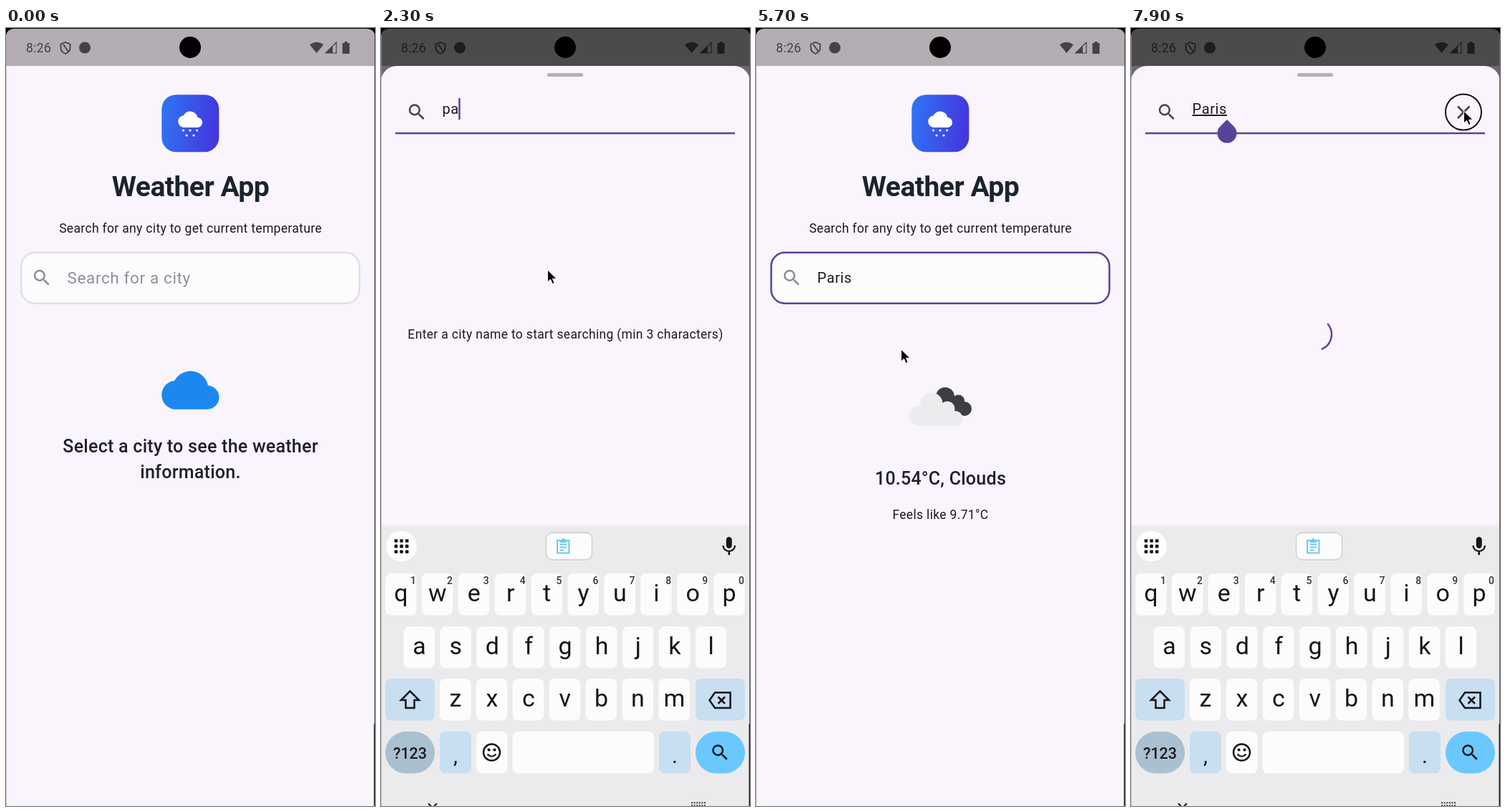
An HTML page that plays this animation: 515 by 1087 pixels, repeating every 8 s.

```html
<!DOCTYPE html>
<html lang="en">
<head>
<meta charset="utf-8">
<title>Weather App</title>
<style>
  html, body { margin: 0; width: 100%; height: 100%; overflow: hidden; background: #faf4fc; }
  svg { display: block; }
  text { font-family: Roboto, Arial, sans-serif; fill: #1b1a20; white-space: pre; }
  .body { font-size: 20px; letter-spacing: .63px; }
  .small { font-size: 17.5px; letter-spacing: .33px; }
  .head { font-size: 25px; font-weight: 500; letter-spacing: .26px; fill: #1c202c; }
  .title { font-size: 39px; font-weight: 700; letter-spacing: -.5px; fill: #1b232e; }
  .mid { text-anchor: middle; }
  .key { font-size: 34px; text-anchor: middle; fill: #161618; }
  .hint { font-size: 14px; font-weight: 500; text-anchor: middle; fill: #333338; }
  .line { fill: none; stroke: #161618; stroke-width: 2.5; }
  .spin { fill: none; stroke: #55459a; stroke-width: 2.5; }
</style>
</head>
<body>
<svg width="515" height="1087" viewBox="0 0 515 1087">
  <defs>
    <linearGradient id="blue" x2="1" y2=".12">
      <stop stop-color="#2f76f4"/><stop offset="1" stop-color="#4338df"/>
    </linearGradient>
    <radialGradient id="ink">
      <stop offset=".5" stop-color="#000" stop-opacity=".1"/>
      <stop offset=".78" stop-color="#000" stop-opacity=".07"/>
      <stop offset="1" stop-color="#000" stop-opacity="0"/>
    </radialGradient>
    <clipPath id="row"><rect y="105" width="515" height="71"/></clipPath>
    <path id="cloud" d="M19.35 10.04C18.67 6.59 15.64 4 12 4 9.11 4 6.6 5.64 5.35 8.04 2.34 8.36 0 10.91 0 14c0 3.31 2.69 6 6 6h13c2.76 0 5-2.24 5-5 0-2.64-2.05-4.78-4.65-4.96z"/>
    <path id="glass" d="M15.5 14h-.79l-.28-.27A6.47 6.47 0 0 0 16 9.5 6.5 6.5 0 1 0 9.5 16c1.61 0 3.09-.59 4.23-1.57l.27.28v.79l5 4.99L20.49 19l-4.99-5zm-6 0a4.5 4.5 0 1 1 0-9 4.5 4.5 0 0 1 0 9z"/>
  </defs>

  <rect width="515" height="1087" fill="#faf4fc"/>
  <g id="home">
    <rect width="515" height="53" fill="#b4adb3"/>
    <g fill="#454145">
      <text x="28" y="34" class="small" style="fill:#454145">8:26</text>
      <path d="M76.500 22.500L83 20l6.500 2.500v5c0 4-2.800 7-6.500 8.500-3.700-1.500-6.500-4.500-6.500-8.500zM80 23l7 10" fill="none" stroke="#454145" stroke-width="1.800"/>
      <circle cx="110" cy="27.500" r="8"/>
      <path d="M424 23.500Q433.500 16 443 23.500L433.500 35z"/>
      <path d="M446 35L461 20V35z" fill="none" stroke="#454145" stroke-width="1.200"/>
      <path d="M446 35L456 25V35z"/>
      <path d="M469.500 21h3v-2h4v2h3v15h-10z"/>
    </g>
    <rect x="217.300" y="93.200" width="80" height="80" rx="20" fill="url(#blue)"/>
    <g fill="#fff">
      <use href="#cloud" transform="translate(240.200 110.800) scale(1.410)"/>
      <circle cx="247.500" cy="143" r="1.600"/><circle cx="257" cy="143" r="1.600"/><circle cx="266.500" cy="143" r="1.600"/>
      <circle cx="252" cy="150" r="1.600"/><circle cx="262" cy="150" r="1.600"/>
    </g>
    <text x="257.500" y="234.500" class="title mid">Weather App</text>
    <text x="257.500" y="286" class="small mid">Search for any city to get current temperature</text>
    <rect id="field" x="21.200" y="313.700" width="472" height="71" rx="19" fill="#fcfcfd" stroke-width="2.500"/>
    <use href="#glass" transform="translate(35 334) scale(1.250)" fill="#8f8b97"/>
    <text id="prompt" x="85.500" y="357" style="font-size:22.500px;letter-spacing:.63px;fill:#918d9b">Search for a city</text>
    <text id="chosen" x="85.500" y="356" class="body">Paris</text>
    <g id="empty">
      <use href="#cloud" transform="translate(217.300 466) scale(3.340)" fill="#1c88ef"/>
      <text x="257.500" y="593" class="head mid">Select a city to see the weather</text>
      <text x="257.500" y="629" class="head mid">information.</text>
    </g>
    <g id="weather">
      <g fill="#3e3d41"><circle cx="264" cy="515" r="13"/><circle cx="282.500" cy="521" r="8.500"/><circle cx="291" cy="532" r="10"/><path d="M258 515H286V542H258z"/></g>
      <g fill="#ececee"><circle cx="245" cy="525" r="15.500"/><circle cx="228" cy="542" r="14"/><circle cx="267" cy="532" r="10.500"/><circle cx="278" cy="545.500" r="10.500"/><path d="M228 528H272L278 556H228z"/></g>
      <text x="257.500" y="638" class="head mid">10.54°C, Clouds</text>
      <text x="257.500" y="686" class="small mid">Feels like 9.71°C</text>
    </g>
    <path id="homeSpin" class="spin" transform="translate(257.500 506)"/>
  </g>
  <rect id="scrim" width="515" height="1087"/>

  <g id="sheet">
    <rect width="515" height="1200" rx="22" fill="#faf4fc"/>
    <rect x="232" y="10" width="50" height="5" rx="2.500" fill="#b4b0b6"/>
    <use href="#glass" transform="translate(35 49.500) scale(1.250)" fill="#45404a"/>
    <text id="query" x="85.500" y="67" class="body"></text>
    <rect id="caret" y="45" width="2.500" height="30" fill="#55459a"/>
    <rect id="rule" x="20" width="474"/>
    <g id="list"></g>
    <g clip-path="url(#row)"><circle id="ripple" cx="130" cy="141" fill="url(#ink)"/></g>
    <g id="clear">
      <circle id="ring" cx="464" cy="64.500" r="25" fill="none" stroke="#111" stroke-width="2"/>
      <path d="M456 56.500l16.500 16.500M472.500 56.500L456 73" fill="none" stroke="#45404a" stroke-width="2.500"/>
    </g>
    <path id="grip" d="M134 75l9.600 9.600a13.500 13.500 0 1 1-19.200 0z" fill="#55459a"/>
    <g id="center">
      <path id="spin" class="spin"/>
      <text id="note" y="5.500" class="small mid">Enter a city name to start searching (min 3 characters)</text>
    </g>
  </g>

  <g id="board">
    <rect y="694" width="515" height="3" fill="#f2eff4"/>
    <rect y="696" width="515" height="500" fill="#ebebed"/>
    <circle cx="28.500" cy="724" r="21.500" fill="#fdfdfd"/>
    <g id="dots" fill="#161618"></g>
    <g id="chip">
      <rect x="230.500" y="705" width="64" height="38" rx="9" fill="#fcfcfd" stroke="#cbcbcf" stroke-width="1.300"/>
      <path d="M246 716h16.500v17.500H246zM249.500 721.500h9.500M249.500 725.500h9.500M249.500 729.500h6" fill="none" stroke="#6dc8f0" stroke-width="2"/>
      <path d="M250 719v-4h2.500a2 2 0 0 1 4 0h2.500v4z" fill="#6dc8f0"/>
    </g>
    <path transform="translate(469.800 708.300) scale(1.330)" fill="#161618" d="M12 14c1.660 0 2.990-1.340 2.990-3L15 5c0-1.660-1.340-3-3-3S9 3.340 9 5v6c0 1.660 1.340 3 3 3zm5.300-3c0 3-2.540 5.100-5.300 5.100S6.700 14 6.700 11H5c0 3.410 2.720 6.230 6 6.720V21h2v-3.280c3.280-.48 6-3.300 6-6.720h-1.700z"/>
    <g id="keys"></g>
    <path class="line" d="M40.500 926.500L53 939H46.500V950H34.500V939H28z"/>
    <path class="line" d="M466 928.500H487.500V950H466L458.500 939.200zM470.500 934.500l9.500 9.500M480 934.500l-9.500 9.500"/>
    <text x="40.500" y="1021" class="mid" style="font-size:21.500px;font-weight:500">?123</text>
    <text x="104" y="1027" class="key" style="font-size:30px">,</text>
    <text x="410" y="1027" class="key" style="font-size:30px">.</text>
    <circle class="line" cx="154.500" cy="1012" r="11.500"/>
    <circle cx="150.500" cy="1008.500" r="2"/><circle cx="158.500" cy="1008.500" r="2"/>
    <path class="line" style="stroke-width:2.200" d="M148.500 1014.500q6 6.500 12 0"/>
    <use href="#glass" transform="translate(458.500 997.500) scale(1.230)" fill="#161618"/>
    <path class="line" style="stroke-width:2" d="M66 1083.500l6 6 6-6"/>
    <path d="M433 1082.500h20M433 1086.500h20" stroke="#333" stroke-width="2" stroke-dasharray="2 1.600"/>
  </g>

  <path d="M0 0H515V10Q513 1 503 1H12Q2 1 0 10z"/>
  <rect y="10" width=".6" height="1077" fill="#aaa6ac"/>
  <rect x="514" y="8" width="1" height="1079" fill="#5c595e"/>
  <rect x="513.500" y="972" width="1.500" height="115" fill="#222"/>
  <circle cx="257" cy="27" r="15"/>
  <path id="mouse" d="M0 0V17L4 13.200L6.800 19.500L9.600 18.300L7 12.200H12.500z" stroke="#fff" stroke-width="1" stroke-linejoin="round"/>
</svg>
<script>
const LOOP = 8000, STEP = 100;
const el = id => document.getElementById(id);
const set = (id, attrs) => { for (const k in attrs) el(id).setAttribute(k, attrs[k]); };
const show = (id, on) => { el(id).style.display = on ? '' : 'none'; };
const move = (id, x, y) => set(id, { transform: `translate(${x} ${y})` });
const within = (t, a, b) => t >= a && t < b;

// Last value whose time has come.
const hold = (t, rows) => rows.reduce((v, r) => t >= r[0] ? r[1] : v, rows[0][1]);

// Linear interpolation through [time, value] rows.
function track(t, rows) {
  const i = rows.findIndex(r => r[0] > t);
  if (i < 0) return rows[rows.length - 1][1];
  if (i === 0) return rows[0][1];
  const [a, v] = rows[i - 1], [b, w] = rows[i];
  return v + (w - v) * (t - a) / (b - a);
}

// Cubic (.4, 0, .2, 1), solved by bisection.
function ease(x) {
  if (x <= 0) return 0;
  if (x >= 1) return 1;
  let lo = 0, hi = 1, s;
  for (let i = 0; i < 20; i++) {
    s = (lo + hi) / 2;
    const u = 1 - s;
    if (1.2 * u * u * s + .6 * u * s * s + s ** 3 < x) lo = s; else hi = s;
  }
  return 3 * (1 - s) * s * s + s ** 3;
}

// Material indeterminate ring.
function ringPath(age) {
  const p = age / 1333 % 1, turn = age / 2222 % 1;
  const head = ease(p * 2), tail = ease(p * 2 - 1);
  const start = Math.PI * (-.5 + tail * 1.5 + turn * 2 + p * .5);
  const sweep = Math.max((head - tail) * 1.5 * Math.PI, .01);
  const at = a => `${22.5 * Math.cos(a)} ${22.5 * Math.sin(a)}`;
  return `M${at(start)}A22.5 22.5 0 ${sweep > Math.PI ? 1 : 0} 1 ${at(start + sweep)}`;
}

function buildKeys() {
  const key = (x, y, w, fill = '#fcfcfd', r = 8) =>
    `<rect x="${x}" y="${y}" width="${w}" height="58.500" rx="${r}" fill="${fill}"/>`;
  const rows = [['qwertyuiop', 6, 762], ['asdfghjkl', 31.5, 836], ['zxcvbnm', 82, 909]];
  let out = '';
  rows.forEach(([letters, left, y], n) => [...letters].forEach((c, i) => {
    const x = left + i * 50.9;
    out += key(x, y, 43.5) + `<text class="key" x="${x + 22}" y="${y + 39}">${c}</text>`;
    if (n === 0) out += `<text class="hint" x="${x + 39}" y="${y + 15}">${(i + 1) % 10}</text>`;
  }));
  const pale = '#c8def1';
  out += key(6, 909, 69, pale) + key(439, 909, 69, pale)
    + key(6, 983, 69, '#a9c0d1', 29) + key(82, 983, 44, pale) + key(133, 983, 43.5)
    + key(183.5, 983, 197.5) + key(388, 983, 44, pale) + key(439, 983, 69, '#6ac8ff', 29);
  el('keys').innerHTML = out;

  let dots = '';
  for (let i = 0; i < 9; i++)
    dots += `<rect x="${18.7 + i % 3 * 7.6}" y="${714.2 + Math.floor(i / 3) * 7.6}" width="4.600" height="4.600" rx="1"/>`;
  el('dots').innerHTML = dots;
}

function buildList() {
  const cities = ['Paris FR', 'Le Touquet-Paris-Plage FR', 'Paris US', 'Paris US', 'Paris CA'];
  el('list').innerHTML = cities.map((c, i) =>
    `<text class="body" x="20.500" y="${147.2 + i * 71.4}">${c}</text>` +
    (i < 4 ? `<rect y="${176 + i * 71.4}" width="515" height="1.250" fill="#c6c1c9"/>` : '')).join('');
}

const drop = [[800, 448], [900, 360], [1000, 181], [1100, 0], [4900, 0], [5000, 60], [5100, 181],
  [5200, 400], [5300, 448], [6900, 448], [7000, 360], [7100, 181], [7200, 0]];
const slide = [[800, 760], [900, 150], [1000, 0], [4900, 0], [5000, 25], [5100, 100],
  [5200, 400], [5300, 760], [6900, 760], [7000, 150], [7100, 0]];
const shade = [[800, 0], [900, .4], [1000, .57], [5000, .57], [5100, .53], [5200, .25],
  [5300, 0], [6900, 0], [7000, .4], [7100, .57]];
const typed = [[0, ''], [2100, 'p'], [2250, 'pa'], [2500, 'par'], [2680, 'pari'], [2845, 'paris'], [6000, 'Paris']];
const blinks = [[0, 850], [2100, 2100], [2250, 2250], [2500, 2500], [2680, 2680], [2845, 2845], [6900, 6900], [7190, 7190]];
const panes = [[0, ''], [785, 'spin'], [1500, 'note'], [3345, 'spin'], [4000, 'list'],
  [6000, 'spin'], [7300, 'list'], [7690, 'spin']];
const spins = [[0, 785], [3345, 3345], [6000, 6900], [7690, 7690]];
const mouseX = [[300, 300], [500, 232.5], [4300, 232.5], [4700, 96], [5100, 94.5], [5600, 124],
  [6000, 438], [6500, 190], [6700, 180.5], [6850, 180.5], [7190, 134], [7400, 134], [7800, 464.5]];
const mouseY = [[300, 420], [500, 338], [4300, 338], [4700, 198], [5100, 238], [5600, 330],
  [6000, 806], [6500, 430], [6700, 415], [6850, 350], [7190, 113], [7400, 113], [7800, 116]];

function draw(t) {
  const picked = t >= 5200, focus = !within(t, 4800, 6900);
  set('field', { stroke: within(t, 700, 4800) || picked ? '#55459a' : '#e0dfe8' });
  show('prompt', !picked);
  show('chosen', picked);
  show('empty', t < 5200);
  show('weather', t >= 5500);
  show('homeSpin', within(t, 5200, 5500));
  set('homeSpin', { d: ringPath(Math.max(0, t - 5200)) });
  set('scrim', { opacity: track(t, shade) });

  const down = track(t, drop), top = Math.max(53, 696 + down - 814);
  move('sheet', 0, top + track(t, slide));
  move('board', 0, down);
  move('center', 257.5, 428 + down * .5525 - top);

  const text = hold(t, typed), query = el('query');
  query.textContent = text || 'Type a city';
  query.style.fill = text ? '#1b1a20' : '#45404a';
  query.style.textDecoration = within(t, 2400, 4800) || t >= 7190 ? 'underline' : 'none';
  set('caret', { x: 84.8 + (text ? query.getComputedTextLength() : 0) });
  show('caret', focus && (t - hold(t, blinks)) % 1000 < 500);
  set('rule', focus ? { y: 92.8, height: 2.5, fill: '#55459a' } : { y: 93.9, height: 1.3, fill: '#5f5b78' });

  const pane = hold(t, panes);
  show('spin', pane === 'spin');
  show('note', pane === 'note');
  show('list', pane === 'list');
  set('spin', { d: ringPath(Math.max(0, t - hold(t, spins))) });
  show('clear', t >= 4000);
  show('ring', t >= 7700);
  show('grip', t >= 7190);
  show('chip', !within(t, 4000, 6000));
  show('ripple', within(t, 4800, 5400));
  set('ripple', { r: track(t, [[4800, 20], [5100, 74], [5300, 110]]) });

  show('mouse', t >= 300);
  move('mouse', track(t, mouseX), track(t, mouseY));
}

buildKeys();
buildList();
const begin = performance.now();
function tick() {
  const t = (performance.now() - begin) % LOOP;
  draw(Math.floor(t / STEP) * STEP);
  requestAnimationFrame(tick);
}
tick();
</script>
</body>
</html>
```
